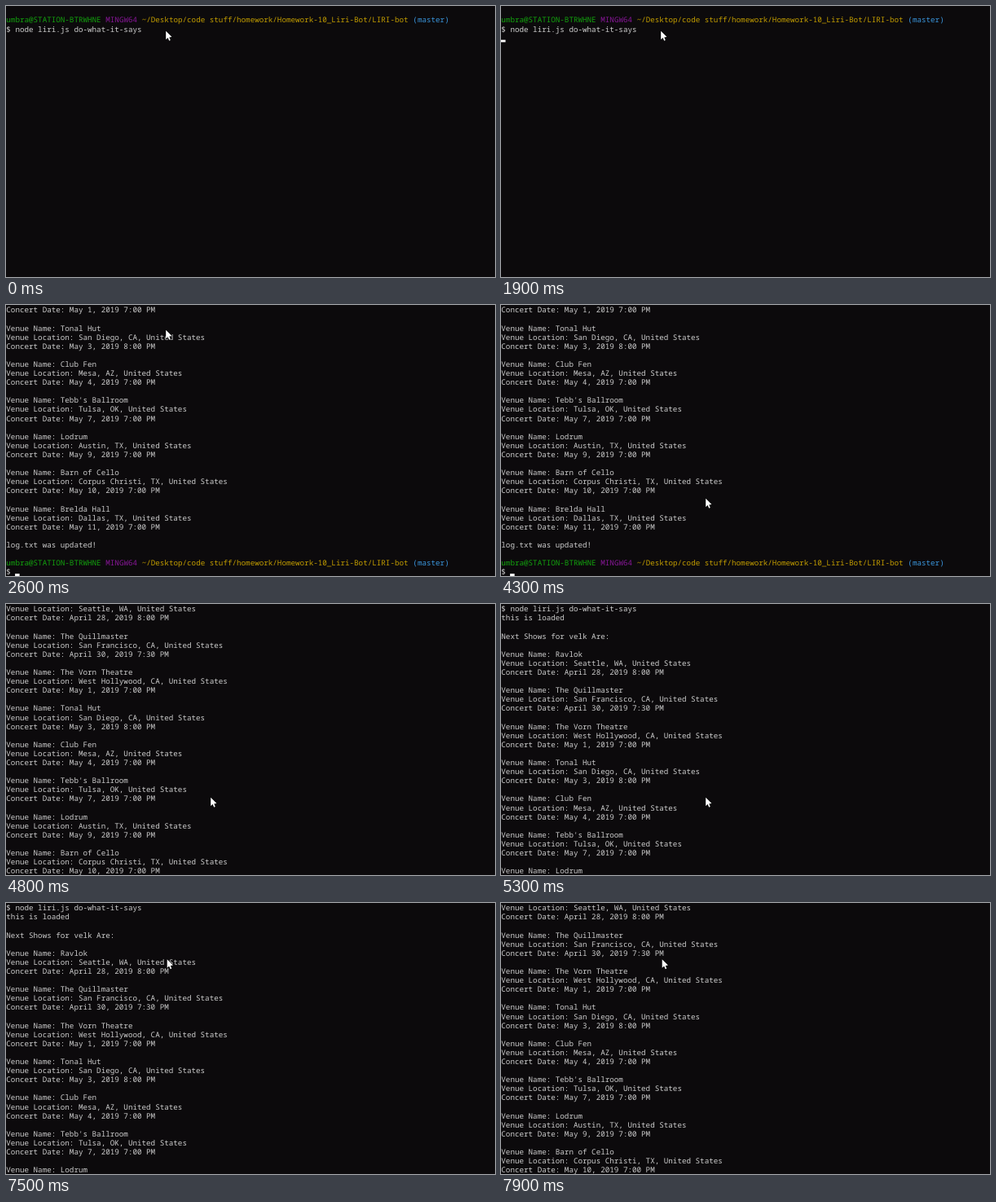
These frames come from a looping animation (600 by 333 pixels, 8000 ms). An HTML page with a canvas:

```html
<!DOCTYPE html>
<html lang="en">
<head>
<meta charset="utf-8">
<title>Terminal session</title>
<style>
  html, body { margin: 0; width: 100%; height: 100%; overflow: hidden; background: #0c0a0c; }
  canvas { display: block; }
</style>
</head>
<body>
<canvas id="stage" width="600" height="333"></canvas>
<script>
const ctx = document.getElementById('stage').getContext('2d');
const LOOP = 8000, TICK = 100;
const ROWS = 30, ROW_H = 11.1, COL_W = 5.545, LEFT = 0.3, BASELINE = 9.32;
const BACKGROUND = '#0c0a0c', TEXT = '#cccccc';

const ENTER = 1900, LOADED = 2000, LISTED = 2100, DONE = 2300;
const BLINK_START = 30, BLINK = 530;
const WHEEL_LINES = 3;

const PROMPT = [
  ['umbra@STATION-BTRWHNE ', '#13a10e'],
  ['MINGW64 ', '#881798'],
  ['~/Desktop/code stuff/homework/Homework-10_Liri-Bot/LIRI-bot ', '#c19c00'],
  ['(master)', '#3a96dd']
];

const SHOWS = [
  ['Ravlok', 'Seattle, WA', 'April 28, 2019 8:00 PM'],
  ['The Quillmaster', 'San Francisco, CA', 'April 30, 2019 7:30 PM'],
  ['The Vorn Theatre', 'West Hollywood, CA', 'May 1, 2019 7:00 PM'],
  ['Tonal Hut', 'San Diego, CA', 'May 3, 2019 8:00 PM'],
  ['Club Fen', 'Mesa, AZ', 'May 4, 2019 7:00 PM'],
  ["Tebb's Ballroom", 'Tulsa, OK', 'May 7, 2019 7:00 PM'],
  ['Lodrum', 'Austin, TX', 'May 9, 2019 7:00 PM'],
  ['Barn of Cello', 'Corpus Christi, TX', 'May 10, 2019 7:00 PM'],
  ['Brelda Hall', 'Dallas, TX', 'May 11, 2019 7:00 PM']
];

const LINES = [
  'log.txt was updated!', '', PROMPT, '$ node liri.js do-what-it-says',
  'this is loaded', '', 'Next Shows for velk Are:', '',
  ...SHOWS.flatMap(([name, place, date]) => [
    'Venue Name: ' + name,
    'Venue Location: ' + place + ', United States',
    'Concert Date: ' + date,
    ''
  ]),
  'log.txt was updated!', '', PROMPT, '$ '
];

const POINTER_START = { x: 196.2, y: 30.7 };
const POINTER_MOVES = [
  { from: 3500, to: 4300, x: 251.2, y: 237.7 },
  { from: 5400, to: 5800, x: 134.2, y: 76.7 },
  { from: 6100, to: 6300, x: 92, y: 39 },
  { from: 6600, to: 7000, x: 197.7, y: 69.2 }
];
const ARROW = new Path2D('M0 0V10.5L2.4 8.3L4 12L5.6 11.3L4.1 7.7L7.3 7.4Z');

const clamp = (v, low, high) => Math.min(Math.max(v, low), high);

// Wheel clicks made so far, one per interval
const clicks = (t, start, interval, max) => clamp(Math.ceil((t - start) / interval), 0, max);

function printedLines(t) {
  if (t < LOADED) return 4;
  if (t < LISTED) return 5;
  return t < DONE ? LINES.length - 3 : LINES.length;
}

function pointerAt(t) {
  let { x, y } = POINTER_START;
  for (const move of POINTER_MOVES) {
    const p = clamp((t - move.from) / (move.to - move.from), 0, 1);
    const eased = p * p * (3 - 2 * p);
    x += (move.x - x) * eased;
    y += (move.y - y) * eased;
  }
  return [x, y];
}

function drawLine(line, row) {
  const runs = typeof line === 'string' ? [[line, TEXT]] : line;
  let col = 0;
  for (const [text, color] of runs) {
    ctx.fillStyle = color;
    ctx.fillText(text, LEFT + col * COL_W, row * ROW_H + BASELINE);
    col += text.length;
  }
}

function drawPointer(t) {
  ctx.save();
  ctx.translate(...pointerAt(t));
  ctx.strokeStyle = '#000';
  ctx.stroke(ARROW);
  ctx.fillStyle = '#fff';
  ctx.fill(ARROW);
  ctx.restore();
}

function draw(t) {
  ctx.fillStyle = BACKGROUND;
  ctx.fillRect(0, 0, 600, 333);
  ctx.font = '500 9.242px "Noto Sans Mono", "DejaVu Sans Mono", monospace';
  ctx.textRendering = 'geometricPrecision';

  const printed = printedLines(t);
  const busy = t >= ENTER && t < DONE;
  const caretLine = busy ? printed : printed - 1;
  const caretCol = busy ? 0 : LINES[caretLine].length;

  const scrolledUp = clicks(t, 4300, 200, 6) - clicks(t, 7450, 130, 3);
  const top = Math.max(1, caretLine - ROWS + 1) - scrolledUp * WHEEL_LINES;
  LINES.slice(top, Math.min(printed, top + ROWS)).forEach(drawLine);

  if (busy || Math.floor((t - BLINK_START) / BLINK) % 2 === 0) {
    ctx.fillStyle = '#fff';
    ctx.fillRect(caretCol * COL_W, (caretLine - top + 1) * ROW_H - 2.8, COL_W, 2.8);
  }
  drawPointer(t);
}

function frame() {
  const t = performance.now() % LOOP;
  draw(Math.floor(t / TICK) * TICK);
  requestAnimationFrame(frame);
}
frame();
</script>
</body>
</html>
```
